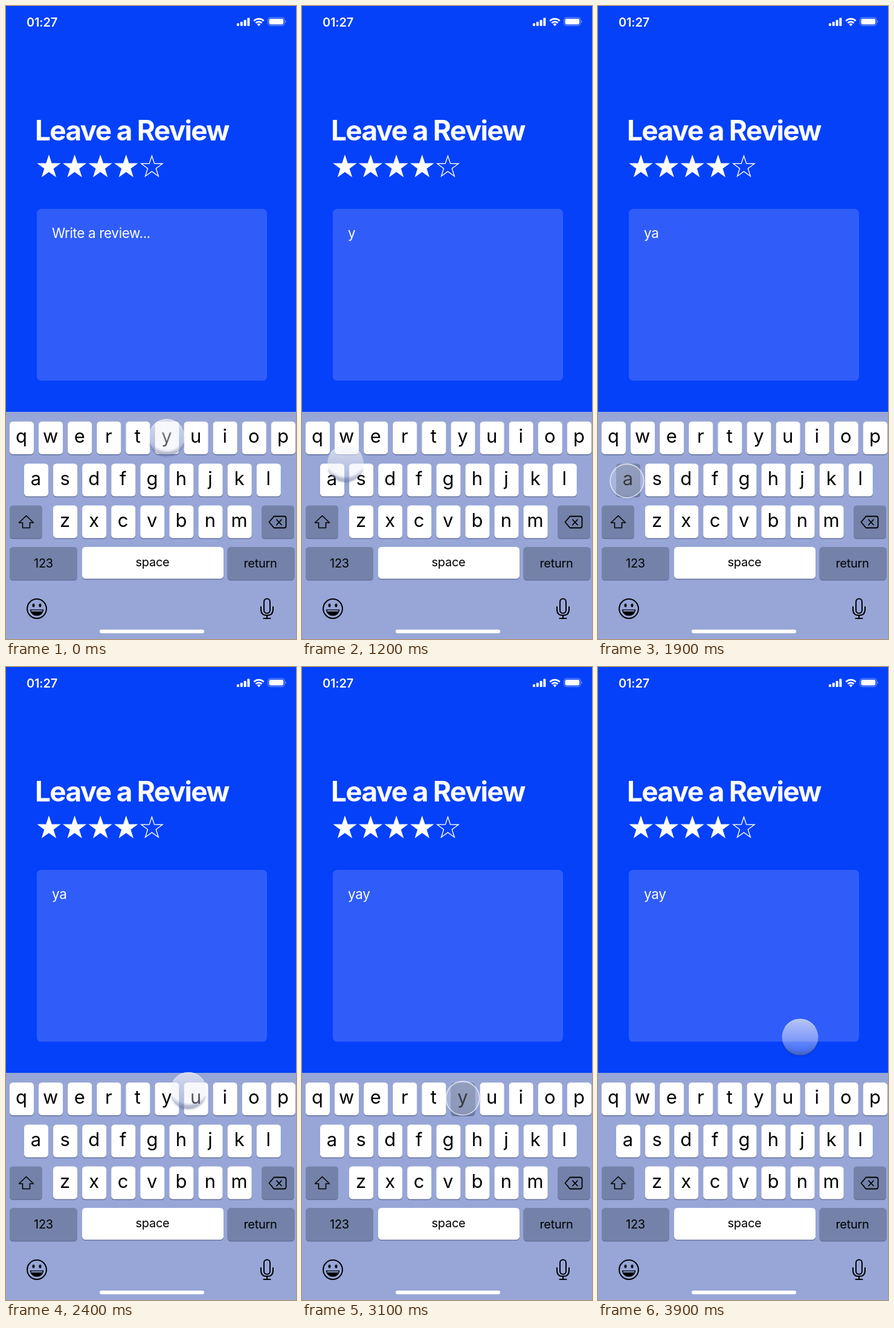
Recreate the animation shown at these times as an HTML page. Size 480 by 1045 pixels, loop 4000 ms.

```html
<!DOCTYPE html>
<html lang="en">
<head>
<meta charset="utf-8">
<title>Leave a Review</title>
<style>
  html, body { margin: 0; width: 100%; height: 100%; overflow: hidden; background: #0541f9; }
  svg { display: block; width: 100%; height: 100%; font-family: Inter, "Open Sans", sans-serif; }
  .white { fill: #fff; }
  .letter { font-size: 31px; text-anchor: middle; }
  .label { font-size: 20px; letter-spacing: -.3px; text-anchor: middle; }
  .icon { fill: none; stroke: #000; stroke-width: 1.6; stroke-linejoin: round; stroke-linecap: round; }
</style>
</head>
<body>
<svg viewBox="0 0 480 1045">
  <defs>
    <linearGradient id="glass" x2="0" y2="1">
      <stop offset="0" stop-color="#f4f5f9" stop-opacity=".68"/>
      <stop offset="1" stop-color="#e6e9f4" stop-opacity=".24"/>
    </linearGradient>
    <filter id="blur" x="-30%" y="-30%" width="160%" height="160%"><feGaussianBlur stdDeviation="2"/></filter>
  </defs>
  <rect width="480" height="1045" fill="#0541f9"/>

  <g class="white">
    <text x="34" y="34" font-size="20" font-weight="600" letter-spacing="-.2">01:27</text>
    <g id="signal"></g>
    <g fill="none" stroke="#fff" stroke-width="2.7">
      <path d="M410.3 24.6a11.5 11.5 0 0 1 16.4 0M413.4 28a7.2 7.2 0 0 1 10.2 0"/>
    </g>
    <path d="M415.6 30.2a4.2 4.2 0 0 1 5.8 0l-2.9 3z"/>
    <rect x="433.6" y="19.1" width="27.5" height="13.3" rx="4" fill="none" stroke="#fff" stroke-opacity=".5"/>
    <rect x="435.5" y="21" width="23.7" height="9.5" rx="2.4"/>
    <path d="M462.6 23.6q2 2.2 0 4.4z" opacity=".6"/>
    <text x="48" y="221.500" font-size="46" font-weight="700" letter-spacing="-1.7">Leave a Review</text>
    <g id="stars" stroke="#fff" stroke-width="1.4"></g>
  </g>

  <rect x="51" y="335" width="381" height="283.500" rx="7" fill="#305df9"/>
  <text id="review" class="white" x="76" y="383" font-size="22.500" letter-spacing="-.35"></text>

  <rect y="670" width="480" height="375" fill="#97a6d7"/>
  <g id="keys"></g>
  <g class="icon">
    <path d="M33.500 841.500L45.500 853H39.500V861.500H27.500V853H21.500Z"/>
    <path d="M443.500 842.500H460.500Q463.500 842.500 463.500 845.500V858.500Q463.500 861.500 460.500 861.500H443.500L435.500 852ZM448 848l8 8.500m0-8.500l-8 8.500" stroke-width="1.8"/>
    <circle cx="51" cy="995" r="15.900" stroke-width="2"/>
    <path d="M40.500 997H61.500Q59.500 1006 51 1006T40.500 997Z" fill="#000"/>
    <path d="M42.500 998.600H59.500" stroke="#97a6d7" stroke-width="2"/>
    <rect x="427" y="978.500" width="10" height="24" rx="5" stroke-width="2"/>
    <path d="M422 992V996Q422 1006 432 1006T442 996V992M432 1006V1011M426.500 1011H437.500" stroke-width="2"/>
  </g>
  <ellipse cx="45.500" cy="989.500" rx="2" ry="3"/>
  <ellipse cx="56.500" cy="989.500" rx="2" ry="3"/>
  <rect class="white" x="155" y="1029.500" width="173" height="6" rx="3"/>

  <g id="finger">
    <g id="lifted">
      <path d="M-29 8A30 30 0 0 0 29 8A33 31 0 0 1-29 8Z" fill="#1a2a66" opacity=".5" filter="url(#blur)"/>
      <circle r="30" fill="url(#glass)"/>
      <path d="M-25 -16A29.600 29.600 0 0 1 25 -16" fill="none" stroke="#fff" stroke-opacity=".55"/>
      <path d="M-28 10A29.700 29.700 0 0 0 28 10" fill="none" stroke="#2b3a70" stroke-opacity=".25" stroke-width=".8"/>
    </g>
    <circle id="pressed" r="28" fill="#d2d7e6" fill-opacity=".2" stroke="#fff" stroke-opacity=".75" stroke-width="1.400"/>
  </g>
</svg>

<script>
const LOOP = 4000;
const $ = id => document.getElementById(id);

function add(parent, tag, attrs, text = '') {
  const node = document.createElementNS('http://www.w3.org/2000/svg', tag);
  for (const name in attrs) node.setAttribute(name, attrs[name]);
  node.textContent = text;
  parent.append(node);
  return node;
}

// Status bar and rating
[4.5, 7, 10, 13.5].forEach((height, i) =>
  add($('signal'), 'rect', { x: 382 + i * 5.8, y: 33 - height, width: 4, height, rx: 1 }));

function starPoints(cx, cy, radius) {
  return Array.from({ length: 10 }, (_, i) => {
    const r = i % 2 ? radius * .39 : radius;
    const angle = (i / 5 - .5) * Math.PI;
    return `${cx + r * Math.cos(angle)},${cy + r * Math.sin(angle)}`;
  }).join(' ');
}
for (let i = 0; i < 5; i++) {
  add($('stars'), 'polygon', {
    points: starPoints(71 + i * 42.6, 266, 18.5),
    fill: i < 4 ? '#fff' : 'none'
  });
}

// Keyboard
const keyShapes = {};
function key(x, y, width, height, fill) {
  add($('keys'), 'rect', { x, y: y + 1.5, width, height, rx: 5.5, fill: '#65719c' });
  return add($('keys'), 'rect', { x, y, width, height, rx: 5.5, fill });
}
[['qwertyuiop', 6, 686], ['asdfghjkl', 30, 755.5], ['zxcvbnm', 78, 824.5]].forEach(([letters, left, y]) => {
  [...letters].forEach((letter, i) => {
    const x = left + i * 48.1;
    keyShapes[letter] = key(x, y, 40, 54, '#fff');
    add($('keys'), 'text', { x: x + 19.5, y: y + 35, class: 'letter' }, letter);
  });
});
const DARK = '#7482a9';
key(6, 824.5, 54, 54, DARK);
key(423, 824.5, 54, 54, DARK);
key(6, 893, 112, 54, DARK);
key(126, 893, 234, 52.5, '#fff');
key(366.5, 893, 111, 54, DARK);
[['123', 62, 927], ['space', 242.5, 925], ['return', 421, 927]].forEach(([text, x, y]) =>
  add($('keys'), 'text', { x, y, class: 'label' }, text));

// Motion: finger path as [time, x, y]; taps with touch and key times
const path = [
  [0, 266, 712], [890, 266, 712], [1000, 73, 752], [1200, 72, 755],
  [1500, 48, 784], [2000, 48, 784], [2100, 83, 777], [2250, 83, 777],
  [2400, 302, 699], [2500, 318, 693], [2750, 266, 712], [3280, 266, 712],
  [3400, 334, 610], [3500, 334.5, 611], [LOOP, 334.5, 611]
];
const taps = [
  { letter: 'y', touch: 450, down: 560, up: 860, release: 890 },
  { letter: 'a', touch: 1650, down: 1760, up: 1980, release: 2000 },
  { letter: 'y', touch: 2850, down: 2960, up: 3220, release: 3270 }
];

const clamp = v => Math.max(0, Math.min(1, v));
const smooth = v => v * v * (3 - 2 * v);

function fingerAt(t) {
  const i = path.findIndex(point => point[0] > t);
  const [t0, x0, y0] = path[i - 1];
  const [t1, x1, y1] = path[i];
  const k = smooth((t - t0) / (t1 - t0));
  return [x0 + (x1 - x0) * k, y0 + (y1 - y0) * k];
}

function draw(t) {
  let text = '', press = 0, held = null;
  for (const { letter, touch, down, up, release } of taps) {
    if (t >= down) text += letter;
    if (t >= down && t < up) held = letter;
    press = Math.max(press, Math.min(clamp((t - touch) / 120), clamp((release + 60 - t) / 100)));
  }
  $('review').textContent = text || 'Write a review...';
  for (const letter of 'ya') keyShapes[letter].setAttribute('fill', letter === held ? DARK : '#fff');

  const [x, y] = fingerAt(t);
  $('finger').setAttribute('transform', `translate(${x} ${y}) scale(${1 - press * .01})`);
  $('lifted').setAttribute('opacity', 1 - press * .82);
  $('pressed').setAttribute('opacity', press);
}

function frame() {
  draw(performance.now() % LOOP);
  requestAnimationFrame(frame);
}
frame();
</script>
</body>
</html>
```
